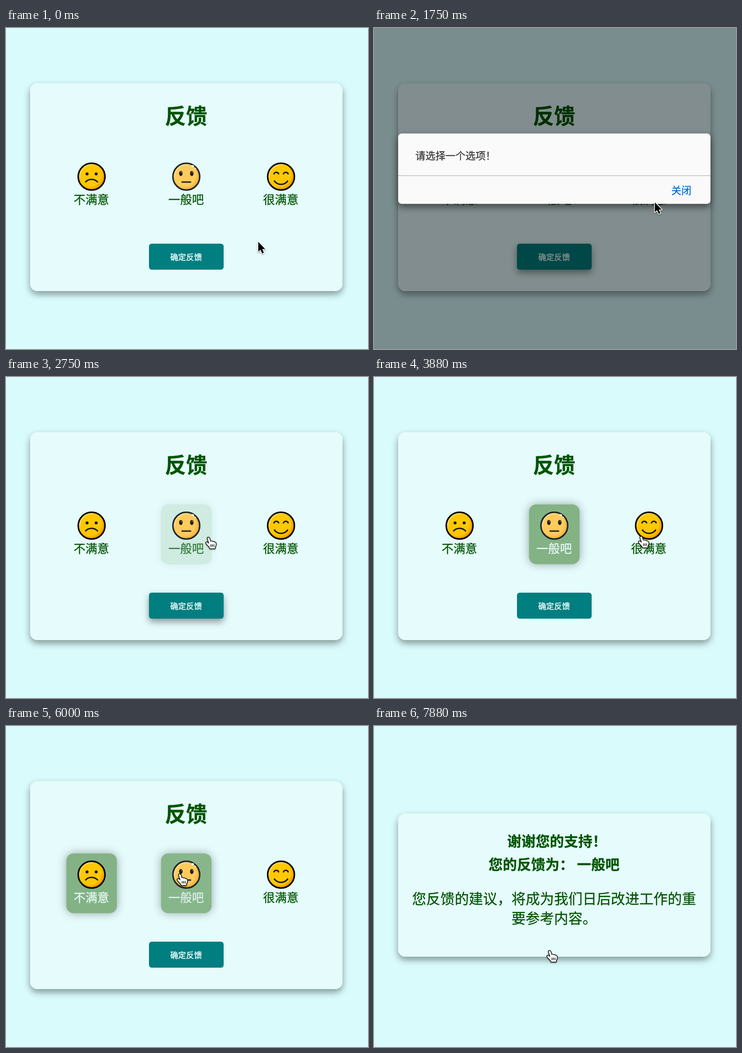
Recreate the animation shown at these times as an HTML page with a canvas. Size 795x704 px, loop 8 s.

```html
<!DOCTYPE html>
<html lang="zh-CN">
<head>
<meta charset="utf-8">
<title>反馈</title>
<style>
html, body { margin: 0; width: 100%; height: 100%; overflow: hidden; background: #d9fbfc; }
canvas { display: block; }
</style>
</head>
<body>
<canvas id="stage" width="795" height="704"></canvas>
<script>
const W = 795, H = 704, LOOP = 8000, STEP = 125;
const ctx = document.getElementById('stage').getContext('2d');
const FONT = '"Noto Sans CJK SC", "Noto Sans CJK", "Noto Sans", sans-serif';
const BG = '#d9fbfc', CARD = '#e5fbfc', GREEN = '#005400', TEAL = '#007e80';
const CENTER = 395.5;
const RESULT_AT = 7750;
const PANEL_SHADOW = { dy: 7, blur: 15, alpha: 0.4 };

// Pointer stops: time, tip x, tip y, shape
const POINTER = [
  [0, 554, 469, 'arrow'], [250, 535, 475, 'arrow'], [625, 455, 496, 'hand'],
  [875, 424, 504, 'hand'], [1000, 424, 504, 'arrow'], [1250, 424, 504, 'arrow'],
  [1875, 665, 352, 'hand'], [2000, 673, 350, 'hand'], [2375, 673, 350, 'hand'],
  [2500, 650, 350, 'arrow'], [2750, 445, 352, 'hand'], [3125, 405, 350, 'hand'],
  [3375, 400, 345, 'hand'], [3750, 400, 345, 'hand'], [3875, 587, 350, 'hand'],
  [4125, 600, 338, 'hand'], [4500, 598, 338, 'hand'], [4625, 540, 336, 'arrow'],
  [4875, 238, 330, 'hand'], [5125, 181, 325, 'hand'], [5500, 181, 325, 'hand'],
  [5625, 255, 326, 'arrow'], [5750, 345, 326, 'hand'], [6000, 382, 325, 'hand'],
  [6500, 382, 327, 'hand'], [6750, 385, 420, 'arrow'], [7000, 386, 478, 'hand'],
  [7250, 386, 493, 'hand'], [8000, 386, 493, 'hand']
];

// Highlight intervals: [on, off] per option
const OPTIONS = [
  { x: 188, label: '不满意', face: drawSad, on: [[4890, 6080]] },
  { x: 396, label: '一般吧', face: drawNeutral, on: [[2720, 4150], [5790, 9000]] },
  { x: 604, label: '很满意', face: drawHappy, on: [[3880, 5250]] }
];
const BUTTON_ON = [[600, 2800], [6930, 9000]];

const clamp = v => Math.max(0, Math.min(1, v));
const ramp = (t, start, span) => clamp((t - start) / span);
const ease = p => 1 - (1 - p) ** 2.4;
const level = (t, spans) => spans.reduce((sum, [on, off]) =>
  sum + ease(ramp(t, on, 300)) - ease(ramp(t, off, 300)), 0);

function mix(a, b, p) {
  const part = (c, i) => parseInt(c.slice(i, i + 2), 16);
  return `rgb(${[1, 3, 5].map(i => Math.round(part(a, i) + (part(b, i) - part(a, i)) * p))})`;
}

// A thin outline (extra) thickens the strokes slightly
function text(str, x, y, size, color, align = 'center', weight = 400, extra = 0.3) {
  ctx.font = `${weight} ${size}px ${FONT}`;
  ctx.textAlign = align;
  ctx.fillStyle = ctx.strokeStyle = color;
  ctx.lineWidth = extra;
  ctx.fillText(str, x, y);
  ctx.strokeText(str, x, y);
}

// Rounded box; its shadow stays outside so translucent fills keep clean
function box(x, y, w, h, r, fill, shadow) {
  const shape = new Path2D();
  shape.roundRect(x, y, w, h, r);
  if (shadow) {
    const outside = new Path2D();
    outside.rect(0, 0, W, H);
    outside.addPath(shape);
    ctx.save();
    ctx.clip(outside, 'evenodd');
    ctx.shadowOffsetY = shadow.dy;
    ctx.shadowBlur = shadow.blur;
    ctx.shadowColor = `rgba(0,0,0,${shadow.alpha})`;
    ctx.fillStyle = fill;
    ctx.fill(shape);
    ctx.restore();
  }
  ctx.fillStyle = fill;
  ctx.fill(shape);
}

function arc(x, y, r, from, to, color, width) {
  ctx.beginPath();
  ctx.arc(x, y, r, from * Math.PI, to * Math.PI);
  ctx.strokeStyle = color;
  ctx.lineWidth = width;
  ctx.stroke();
}

function oval(x, y, rx, ry, color) {
  ctx.beginPath();
  ctx.ellipse(x, y, rx, ry, 0, 0, Math.PI * 2);
  ctx.fillStyle = color;
  ctx.fill();
}

function head(base, edge, light, line) {
  const g = ctx.createRadialGradient(-4, -4, 20, -4, -4, 33);
  g.addColorStop(0, base);
  g.addColorStop(0.4, base);
  g.addColorStop(1, edge);
  oval(0, 0, 29.5, 29.5, g);
  arc(0, 0, 26, 0.98, 1.55, light, 2);
  arc(0, 0, 29.4, 0, 2, line, 3.3);
}

function drawSad() {
  head('#ffc800', '#e99500', '#ffdc66', '#000');
  oval(-10, -6, 3.3, 3.3, '#1c1a10');
  oval(10, -6, 3.3, 3.3, '#1c1a10');
  arc(0, 24, 18, 1.22, 1.78, '#1c1a10', 3);
}

function drawNeutral() {
  head('#ffcb5c', '#f5ac35', '#ffe09a', '#1b262b');
  for (const x of [-12, 12]) {
    oval(x, -7, 3.8, 5.6, '#151b1c');
    oval(x + 0.8, -9, 1.1, 1.8, '#8d8468');
  }
  oval(14, -23, 3, 2.2, '#fffbe8');
  oval(20, -18, 1.5, 1.5, '#fff0c0');
  ctx.fillStyle = '#151b1c';
  ctx.fillRect(-10.5, 10.5, 21, 2.8);
}

function drawHappy() {
  head('#ffc800', '#e99500', '#ffdc66', '#000');
  arc(-10.5, -4, 5.5, 1.05, 1.95, '#1c1a10', 3);
  arc(10.5, -4, 5.5, 1.05, 1.95, '#1c1a10', 3);
  arc(0, -1, 18, 0.18, 0.82, '#1c1a10', 3);
}

function drawOption({ x, label, face, on }, t) {
  const p = level(t, on);
  if (p > 0) {
    ctx.save();
    ctx.globalAlpha = p;
    box(x - 55.5, 279.5, 111, 131, 16, '#83b285', { dy: 0, blur: 20, alpha: 0.34 });
    ctx.restore();
  }
  ctx.save();
  ctx.translate(x, 326);
  face();
  ctx.restore();
  text(label, x - 0.5, 385.5, 26, mix(GREEN, '#e8fbfa', p));
}

function drawForm(t) {
  box(53, 121, 686, 456, 16, CARD, PANEL_SHADOW);
  text('反馈', CENTER, 210, 46.5, GREEN, 'center', 700);
  OPTIONS.forEach(o => drawOption(o, t));
  const p = level(t, BUTTON_ON);
  box(314, 473, 164, 57, 6, TEAL, p > 0 && { dy: 7, blur: 15, alpha: 0.4 * p });
  text('确定反馈', CENTER, 508.5, 17.4, '#e8fbfa', 'center', 500, 0.5);
}

function drawDialog(alpha) {
  if (alpha <= 0) return;
  ctx.save();
  ctx.fillStyle = `rgba(0,0,0,${0.44 * alpha})`;
  ctx.fillRect(0, 0, W, H);
  ctx.globalAlpha = alpha;
  box(53, 231.5, 686, 154, 8, '#fafafa', { dy: 7, blur: 15, alpha: 0.5 });
  ctx.fillStyle = '#bbb';
  ctx.fillRect(53, 323, 686, 1.5);
  text('请选择一个选项！', 91, 287.5, 22, '#333333', 'left');
  text('关闭', 675, 363.5, 22, '#0068d6');
  ctx.restore();
}

function drawResult() {
  box(53, 192, 686, 314, 16, CARD, PANEL_SHADOW);
  text('谢谢您的支持！', 292.5, 263.5, 31.2, GREEN, 'left', 700);
  text('您的反馈为： 一般吧', 251.5, 314.5, 31.2, GREEN, 'left', 700);
  text('您反馈的建议，将成为我们日后改进工作的重', CENTER, 389.5, 31.2, GREEN);
  text('要参考内容。', CENTER, 433, 31.2, GREEN);
}

const ARROW = new Path2D('M0 0V21.5L4.8 17.2L8.6 25.4L12.2 23.8L8.8 15.8H15.2Z');
const HAND = new Path2D('M-2.4 2.5C-2.8-.6 .8-1 1.8 1.8L4.4 9.4C5.2 7.4 7.6 7.8 8.2 9.8' +
  'C9 8.2 11.6 8.6 12 10.8C13 9.6 15.6 10.4 15.8 12.8C16.6 16.5 15 19 13.8 21.5V24H3' +
  'C2.4 20.5-1.4 18.5-4.8 13.8C-6.8 10.8-4.4 9-2.2 11L1.4 14Z');
const FINGERS = new Path2D('M5 15V20.5M8.3 15V20.5M11.6 15V20.5');

function drawPointer(t) {
  const i = Math.max(1, POINTER.findIndex(k => k[0] > t));
  const [t0, x0, y0, kind] = POINTER[i - 1], [t1, x1, y1] = POINTER[i];
  const p = (t - t0) / (t1 - t0);
  ctx.save();
  ctx.translate(x0 + (x1 - x0) * p, y0 + (y1 - y0) * p);
  ctx.lineJoin = 'round';
  ctx.shadowColor = 'rgba(0,0,0,.4)';
  ctx.shadowBlur = 3;
  ctx.shadowOffsetY = 1.5;
  const arrow = kind === 'arrow';
  ctx.lineWidth = arrow ? 3 : 2.8;
  ctx.strokeStyle = arrow ? '#fff' : '#000';
  ctx.stroke(arrow ? ARROW : HAND);
  ctx.shadowColor = 'transparent';
  ctx.fillStyle = arrow ? '#000' : '#fff';
  ctx.fill(arrow ? ARROW : HAND);
  if (!arrow) {
    ctx.lineWidth = 1.4;
    ctx.stroke(FINGERS);
  }
  ctx.restore();
}

function draw(t) {
  ctx.fillStyle = BG;
  ctx.fillRect(0, 0, W, H);
  if (t < RESULT_AT) {
    drawForm(t);
    drawDialog(ramp(t, 992, 250) - ramp(t, 2285, 250));
  } else {
    drawResult();
  }
  drawPointer(t);
}

const start = performance.now();
function tick() {
  const t = (performance.now() - start) % LOOP;
  draw(Math.floor(t / STEP) * STEP);
  requestAnimationFrame(tick);
}
tick();
</script>
</body>
</html>
```
